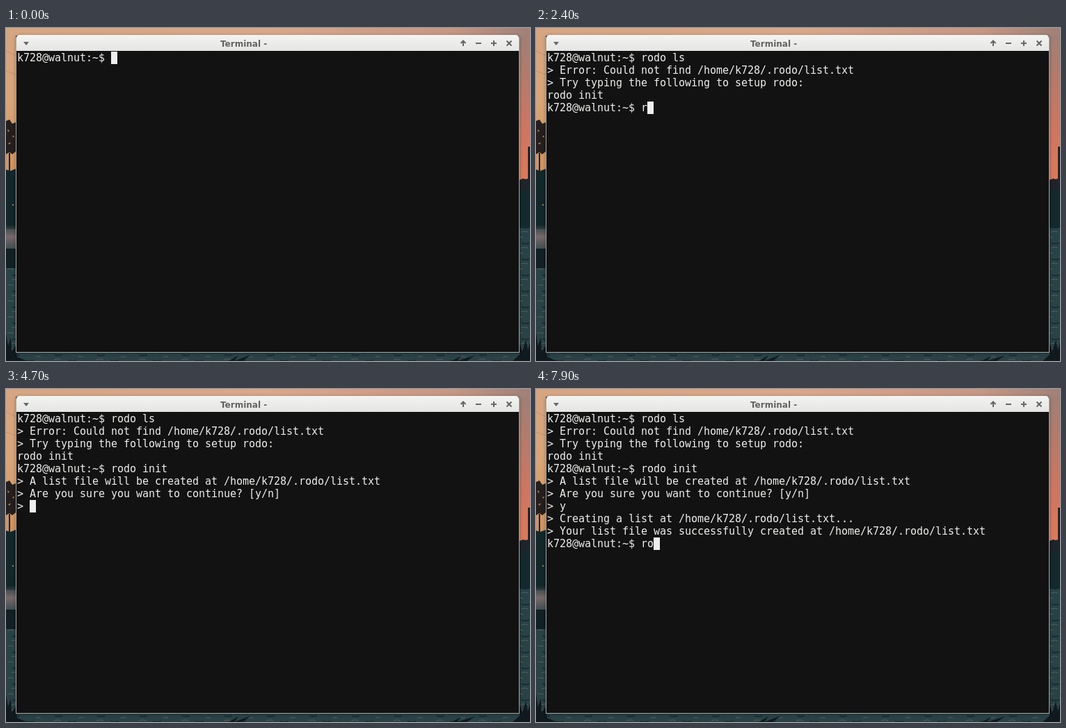
These frames come from a looping animation (753 px wide and 480 px high, 8000 ms). An HTML page:

```html
<!DOCTYPE html>
<html lang="en">
<head>
<meta charset="utf-8">
<title>Terminal</title>
<style>
  html, body { margin: 0; width: 100%; height: 100%; overflow: hidden; background: #142529; }
  #stage { position: relative; width: 753px; height: 480px; overflow: hidden; }
  svg { position: absolute; left: 0; top: 0; }
  #window {
    position: absolute; left: 14px; top: 10px; width: 722px; height: 457px;
    border: solid #a3a7a6; border-width: 0 1px 1px; border-radius: 5px 5px 0 0;
    background: #121212; box-shadow: 0 1px 5px rgba(0, 0, 0, .3); overflow: hidden;
  }
  #bar { height: 23px; background: linear-gradient(#f3f4f2, #e5e6e3); }
  #title {
    position: absolute; left: 308px; top: 16px; white-space: pre;
    font: bold 12px/14px "DejaVu Sans", sans-serif; color: #62625f;
  }
  #screen {
    position: absolute; left: 16px; top: 34px; margin: 0;
    font: 15px/18px "DejaVu Sans Mono", monospace;
    letter-spacing: calc(9px - 1ch); color: #eeeeec;
  }
  #cursor { position: absolute; left: 16px; top: 34px; width: 9px; height: 18px; background: #eeeeec; }
</style>
</head>
<body>
<div id="stage">
  <svg width="753" height="480">
    <defs>
      <linearGradient id="top">
        <stop offset="0" stop-color="#d6a582"/><stop offset=".5" stop-color="#d9a78b"/>
        <stop offset=".85" stop-color="#c69784"/><stop offset="1" stop-color="#a08078"/>
      </linearGradient>
      <linearGradient id="west" x2="0" y2="1">
        <stop offset="0" stop-color="#d6a481"/><stop offset=".5" stop-color="#d9a577"/>
        <stop offset="1" stop-color="#d0915e"/>
      </linearGradient>
      <linearGradient id="east" x2="0" y2="1">
        <stop offset="0" stop-color="#9c8078"/><stop offset=".3" stop-color="#b27b6d"/>
        <stop offset=".65" stop-color="#cd7662"/><stop offset="1" stop-color="#db7a5b"/>
      </linearGradient>
      <linearGradient id="water" x2="0" y2="1">
        <stop offset="0" stop-color="#1a3034"/><stop offset=".4" stop-color="#264347"/>
        <stop offset="1" stop-color="#2a4246"/>
      </linearGradient>
      <linearGradient id="glow" x2="0" y2="1">
        <stop offset="0" stop-color="#77686a" stop-opacity="0"/>
        <stop offset=".4" stop-color="#77686a"/>
        <stop offset="1" stop-color="#77686a" stop-opacity="0"/>
      </linearGradient>
      <pattern id="ripple" width="61" height="23" patternUnits="userSpaceOnUse">
        <path d="M2 3q4-2 9 0M20 8q5-2 13 0M43 14q3-1 7 0M8 18q6-2 10 0M50 5q4-1 8 0" fill="none" stroke="#8a7272" stroke-opacity=".5"/>
        <path d="M9 11q5 2 11 0M33 4q4 1 9 0M28 19q5 2 12 0M49 21q4-1 7 0" fill="none" stroke="#0f1f23" stroke-opacity=".6" stroke-width="2"/>
      </pattern>
    </defs>
    <rect width="753" height="480" fill="url(#water)"/>
    <rect width="14" height="210" fill="url(#west)"/>
    <rect x="737" width="16" height="225" fill="url(#east)"/>
    <rect width="753" height="11" fill="url(#top)"/>
    <path d="M0 33l14 7M0 62l14 5" stroke="#a87d68" stroke-opacity=".5"/>
    <path d="M0 134l5-2 4 6 5-2v42l-5 4-4-3-5 3z" fill="#241f1d"/>
    <path d="M2 146l3 2-2 2zM9 156l3-1-1 3zM3 166l4-1-2 3z" fill="#b98358"/>
    <path d="M4 180h2v30H4z" fill="#241f1d"/>
    <path d="M0 204l6 2 8-3v87H0z" fill="#12272a"/>
    <circle cx="10" cy="255" r="1" fill="#d99a60"/>
    <rect y="284" width="14" height="42" fill="url(#glow)"/>
    <path d="M0 318h14v28H0z" fill="#102024"/>
    <path d="M738 219l5-2 4 1 3-1v-46h3v65h-15z" fill="#1f242a"/>
    <path d="M738 234h15v54h-15z" fill="#14292d"/>
    <rect y="346" width="14" height="134" fill="url(#ripple)"/>
    <rect x="738" y="288" width="15" height="192" fill="url(#ripple)"/>
    <rect y="467" width="753" height="13" fill="url(#ripple)"/>
    <path d="M0 480V440l3 18 4-12 1 20 6-8 2 16 14 6zM320 480l14-8-6 8 24-9-12 9zM640 480l14-7-6 7 26-8-12 8zM728 480l10-9v-16l4 11 5-16 3 14 3-10v26z" fill="#101a1e"/>
  </svg>

  <div id="window"><div id="bar"></div></div>
  <div id="title">Terminal -</div>
  <svg width="753" height="34" fill="none" stroke="#666663" stroke-width="2">
    <path d="M25 20h8l-4 5z" fill="#666663" stroke="none"/>
    <path d="M657 26v-7M653.5 22l3.5-3.5 3.5 3.5M675 22h8M697 22h8M701 18v8M719.5 18.5l7 7M726.5 18.5l-7 7"/>
  </svg>

  <pre id="screen"></pre>
  <div id="cursor"></div>
</div>

<script>
  const LOOP = 8000, CELL = 9, ROW = 18;
  const prompt = 'k728@walnut:~$ ';
  const file = '/home/k728/.rodo/list.txt';
  const screen = document.getElementById('screen');
  const cursor = document.getElementById('cursor');

  const output = [];
  const print = (time, text) => output.push({ time, text });
  const type = (time, text) => [...text].forEach((key, i) => print(time + i * 100, key));

  print(0, prompt);
  type(300, 'rodo ls');
  print(1400, '\n');
  print(1600, `> Error: Could not find ${file}\n> Try typing the following to setup rodo:\nrodo init\n${prompt}`);
  type(2400, 'r');
  type(2600, 'o');
  type(2800, 'do');
  type(3600, ' ');
  type(4000, 'ini');
  type(4400, 't\n');
  print(4700, `> A list file will be created at ${file}\n> Are you sure you want to continue? [y/n]\n> `);
  type(5800, 'y');
  print(6100, `\n> Creating a list at ${file}...\n> Your list file was successfully created at ${file}\n${prompt}`);
  type(7800, 'ro');

  let shown;
  function draw(now) {
    const t = now % LOOP;
    const text = output.filter(o => o.time <= t).map(o => o.text).join('');
    if (text !== shown) {
      const lines = text.split('\n');
      const row = lines.length - 1;
      screen.textContent = shown = text;
      cursor.style.transform = `translate(${lines[row].length * CELL}px, ${row * ROW}px)`;
    }
    requestAnimationFrame(draw);
  }
  draw(0);
</script>
</body>
</html>
```
